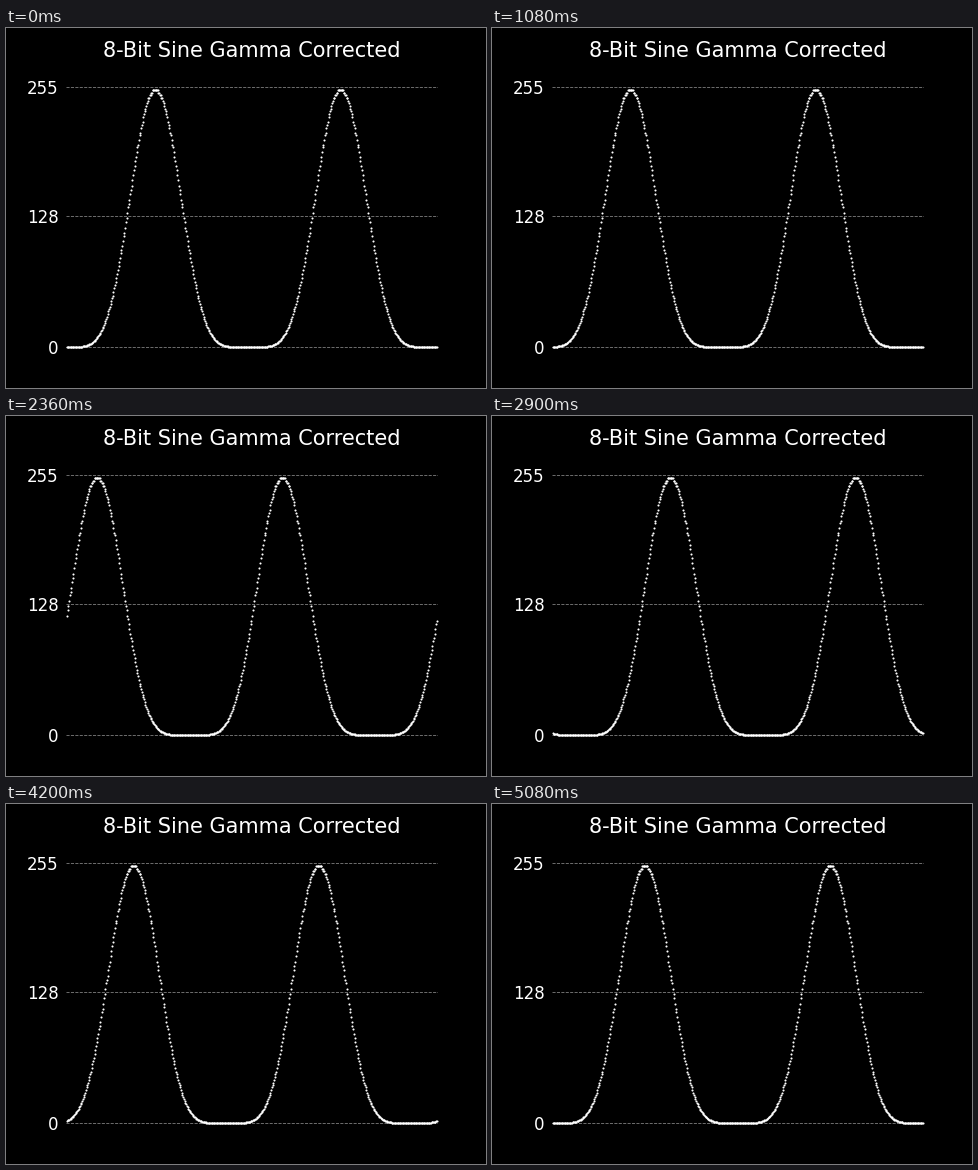
A matplotlib script for the animation above (5.1 s loop, 480 by 360 pixels).

```python
import numpy as np
import matplotlib.pyplot as plt
from matplotlib.animation import FuncAnimation

FRAMES = 255
PERIOD = 255   # samples per sine cycle
STEP = 5       # samples scrolled per frame
GAMMA = 2.8

x = np.arange(2 * PERIOD)


def wave(frame):
    """Quantised sine, then quantised gamma curve."""
    phase = 2 * np.pi * (x + 1 + STEP * (frame + 1)) / PERIOD
    sine = np.round(127 - 127 * np.cos(phase))
    return np.round(255 * (sine / 255) ** GAMMA)


plt.rcParams["font.family"] = "DejaVu Sans"
fig = plt.figure(figsize=(4.8, 3.6), dpi=100, facecolor="black")
ax = fig.add_axes([0.125, 0.1, 0.775, 0.8], facecolor="black")
ax.set_xlim(-1.31, 510.7)
ax.set_ylim(-4.9, 277.3)
ax.spines[:].set_visible(False)
ax.set_xticks([])
ax.set_yticks([0, 128, 255])
ax.tick_params(axis="y", length=0, pad=5.25, labelsize=12, labelcolor="white")
ax.grid(axis="y", color="white", alpha=0.5, linestyle="--", linewidth=0.6)
ax.set_title("8-Bit Sine Gamma Corrected", color="white", fontsize=15, pad=5.2)

curve, = ax.plot(x, wave(0), linestyle="none", marker="o", markersize=1.5,
                 markerfacecolor="white", markeredgewidth=0)


def update(frame):
    curve.set_ydata(wave(frame))
    return curve,


anim = FuncAnimation(fig, update, frames=FRAMES, interval=20,
                     repeat=True, repeat_delay=0)
plt.show()
```
